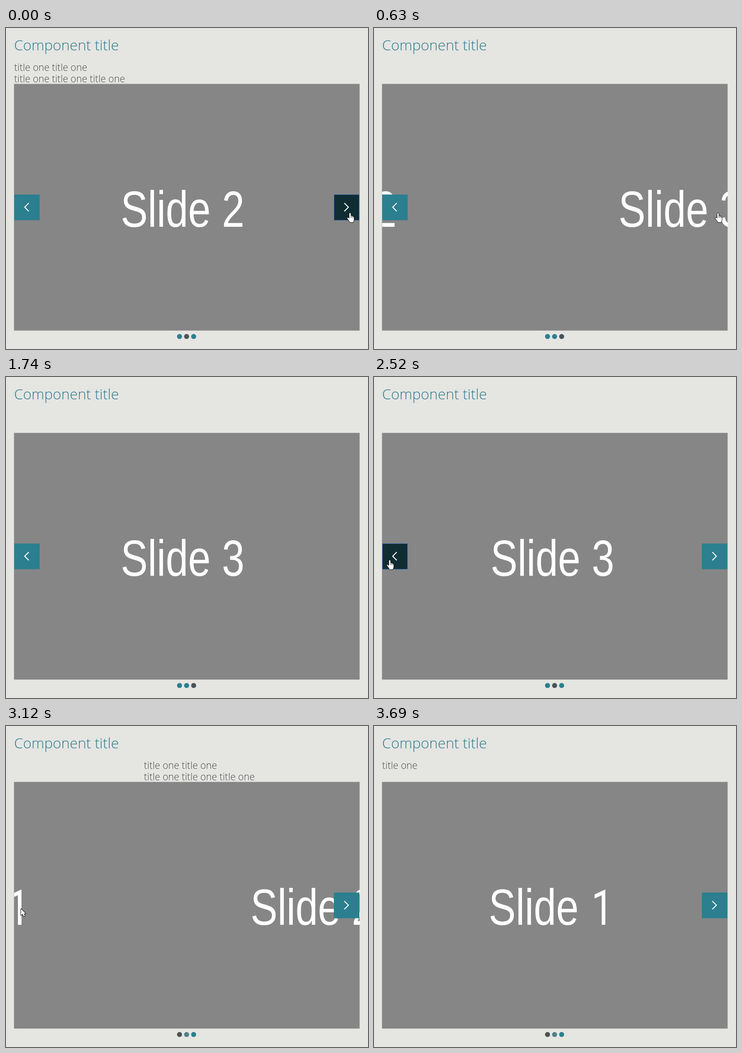
An HTML page with a canvas for the animation above (4.47 s loop, 795 by 704 pixels).

```html
<!DOCTYPE html>
<html lang="en">
<head>
<meta charset="utf-8">
<title>Carousel</title>
<style>
  html, body { margin: 0; width: 100%; height: 100%; overflow: hidden; background: #e5e5e2; }
  canvas { display: block; }
</style>
</head>
<body>
<canvas id="stage" width="795" height="704"></canvas>
<script>
const ctx = document.getElementById('stage').getContext('2d');
const LOOP = 4470, STEP = 30, SLIDE_MS = 250;
const TO_THIRD = 486.7, TO_SECOND = 2507, TO_FIRST = 3013.3;
const VIEW = { x: 17.6, y: 122.6, w: 759, h: 541 };
const TEAL = '#2b7f8f', DARK = '#102d33';
const WORD_FONT = '111px "Liberation Sans", Arial, sans-serif';
const PLAIN_ONE_FONT = '108px Roboto, sans-serif';

const SLIDES = [
  { lines: ['title one'], digitFont: PLAIN_ONE_FONT, digitShift: 4 },
  { lines: ['title one title one', 'title one title one title one'], digitFont: WORD_FONT, digitShift: 0 },
  { lines: [], digitFont: WORD_FONT, digitShift: 0 }
];

const HAND = new Path2D('M5 2Q6.5 -.5 8 2V7Q10 6 10.5 8Q12.5 7 13 9Q15 8.5 15 11V15Q15 18 13 21H6.5Q5 18 1 13Q0 11 2 11Q3.5 11 5 13Z');
const KNUCKLES = new Path2D('M8 7V11M10.5 8V11.5M13 9.5V12');
const ARROW = new Path2D('M0 0V14L3.5 11L6 16.5L8.3 15.5L6 10.5H10Z');

const clamp = v => Math.min(1, Math.max(0, v));
const mix = (a, b, p) => a + (b - a) * p;
const progress = (t, from, ms) => clamp((t - from) / ms);

// cubic-bezier(.42, 0, .58, 1), solved for x by bisection
function easeInOut(x) {
  if (x <= 0 || x >= 1) return clamp(x);
  let lo = 0, hi = 1, s = 0.5;
  for (let i = 0; i < 24; i++) {
    s = (lo + hi) / 2;
    const bx = 1.26 * s * (1 - s) ** 2 + 1.74 * s * s * (1 - s) + s ** 3;
    if (bx < x) lo = s; else hi = s;
  }
  return s * s * (3 - 2 * s);
}

const move = (t, start) => easeInOut(progress(t, start, SLIDE_MS));
const position = t => 1 + move(t, TO_THIRD) - move(t, TO_SECOND) - move(t, TO_FIRST);
const activeSlide = t => t < TO_THIRD ? 1 : t < TO_SECOND ? 2 : t < TO_FIRST ? 1 : 0;

function text(str, x, y, font, color) {
  ctx.font = font;
  ctx.fillStyle = color;
  ctx.fillText(str, x, y);
  return ctx.measureText(str).width;
}

function drawSlides(t) {
  const pos = position(t);
  ctx.fillStyle = '#868686';
  ctx.fillRect(VIEW.x, VIEW.y, VIEW.w, VIEW.h);
  ctx.save();
  ctx.beginPath();
  ctx.rect(18, 70, VIEW.w, 594);
  ctx.clip();
  SLIDES.forEach(({ lines, digitFont, digitShift }, i) => {
    const dx = Math.round((i - pos) * VIEW.w);
    if (Math.abs(dx) >= VIEW.w) return;
    lines.forEach((line, n) =>
      text(line, 18 + dx, 94 + n * 25, '300 21.2px "Open Sans", sans-serif', '#4c4c4c'));
    // the slide picture is narrower than its natural aspect
    ctx.save();
    ctx.translate(252 + dx, 436);
    ctx.scale(0.8, 1);
    const width = text('Slide ', 0, 0, WORD_FONT, '#fff');
    text(String(i + 1), width + digitShift, 0, digitFont, '#fff');
    ctx.restore();
  });
  ctx.restore();
}

function drawButton(x, dir, fill, focused) {
  ctx.fillStyle = fill;
  ctx.fillRect(x, 365.2, 56, 56.4);
  if (focused) {
    ctx.lineWidth = 1;
    ctx.strokeStyle = '#3465b0';
    ctx.strokeRect(x + 0.5, 365.5, 55, 56);
  }
  const cx = x + 27.5;
  ctx.beginPath();
  ctx.moveTo(cx - dir * 4.5, 384);
  ctx.lineTo(cx + dir * 4.5, 393);
  ctx.lineTo(cx - dir * 4.5, 402);
  ctx.strokeStyle = '#fff';
  ctx.lineWidth = 2;
  ctx.stroke();
}

function drawButtons(t) {
  const active = activeSlide(t);
  if (active > 0) {
    const fill = t < 2100 ? TEAL : t < 2130 ? '#1e5661' : DARK;
    drawButton(18, -1, fill, t >= TO_SECOND);
  }
  if (active < 2) {
    const hot = t < TO_THIRD;
    drawButton(720, 1, hot ? DARK : TEAL, hot);
  }
}

function drawDots(t) {
  const active = activeSlide(t);
  for (let i = 0; i < 3; i++) {
    ctx.beginPath();
    ctx.arc(381.1 + i * 15.5, 676.6, 5.5, 0, Math.PI * 2);
    ctx.fillStyle = i === active ? '#4b5355' : active === 0 && i === 1 ? '#50808a' : TEAL;
    ctx.fill();
  }
}

function cursorAt(t) {
  if (t < 1260) return { shape: HAND, x: 749, y: 405 };
  if (t < 1740) {
    const p = easeInOut((t - 1260) / 480), q = 1 - p;
    return {
      shape: ARROW,
      x: q * q * 754 + 2 * p * q * 829 + p * p * 198,
      y: q * q * 418 + 2 * p * q * 600 + p * p * 700
    };
  }
  if (t < 2100) return null;
  if (t < TO_FIRST) return { shape: HAND, x: mix(16, 28, progress(t, 2280, 120)), y: 401 };
  if (t < 3540) {
    const p = easeInOut(progress(t, 3240, 270));
    return { shape: ARROW, x: mix(33, 677, p), y: mix(401, 653, p) };
  }
  if (t < 3690) {
    const p = progress(t, 3540, 150);
    return { shape: ARROW, x: mix(677, 748, p), y: mix(653, 704, p) };
  }
  return null;
}

function drawCursor(t) {
  const c = cursorAt(t);
  if (!c) return;
  ctx.save();
  ctx.translate(Math.round(c.x), Math.round(c.y));
  ctx.lineJoin = 'round';
  ctx.fillStyle = '#fff';
  ctx.strokeStyle = '#1c1c1c';
  ctx.lineWidth = 2;
  ctx.stroke(c.shape);
  ctx.fill(c.shape);
  ctx.lineWidth = 0.8;
  if (c.shape === HAND) ctx.stroke(KNUCKLES);
  ctx.restore();
}

function draw(t) {
  ctx.fillStyle = '#e5e5e2';
  ctx.fillRect(0, 0, 795, 704);
  text('Component title', 17.7, 49, '300 31.7px "Open Sans", sans-serif', '#2f7a8a');
  drawSlides(t);
  drawButtons(t);
  drawDots(t);
  drawCursor(t);
}

const start = performance.now();
function tick() {
  const t = (performance.now() - start) % LOOP;
  draw(Math.floor(t / STEP) * STEP);
  requestAnimationFrame(tick);
}
tick();
</script>
</body>
</html>
```
